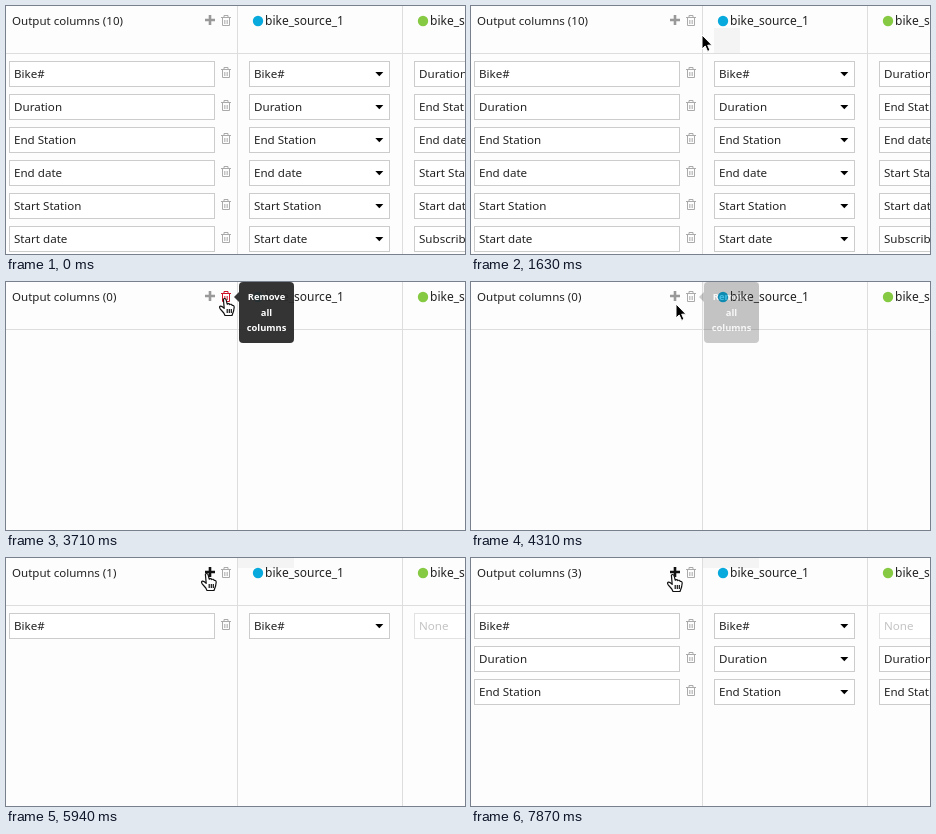
An HTML page for the animation above (8000 ms loop, 459 by 248 pixels).

```html
<!DOCTYPE html>
<html lang="en">
<head>
<meta charset="utf-8">
<title>Column mapping</title>
<style>
  html, body { margin: 0; width: 100%; height: 100%; overflow: hidden; background: #fdfdfd; }
  svg { display: block; width: 459px; height: 248px; }
  text { font: 11.6px "Noto Sans", "Open Sans", sans-serif; fill: #222; }
  .head { font-size: 12px; }
  #count { font-size: 11.55px; }
  .tip text { font: 700 9.4px "Noto Sans", "Open Sans", sans-serif; fill: #fff; text-anchor: middle; }
  .tip .panel { fill: #2a2a2a; fill-opacity: .95; }
  .rule { stroke: #ddd; }
  .box { fill: #fff; stroke: #ccc; }
  .empty .box { stroke: #e2e2e2; }
  .empty text { fill: #c4c4c4; }
  .bin { fill: none; stroke: #aaa; }
  .bin.hot { stroke: #ce1228; }
  .plus { stroke: #999; stroke-width: 2.6; }
  .plus.hot { stroke: #111; }
  .shade { fill: #f4f4f4; }
</style>
</head>
<body>
<svg viewBox="0 0 459 248">
  <defs>
    <g id="bin">
      <path d="M-5 -3.5H5M-2 -3.5V-5.5H2V-3.5M-3.5 -3.5V4.5H3.5V-3.5"/>
      <path d="M-1.5 -1V3M0 -1V3M1.5 -1V3" stroke-width=".7"/>
    </g>
  </defs>
  <rect width="459" height="248" fill="#fdfdfd"/>
  <rect id="shade" class="shade"/>
  <path class="rule" d="M0 47.5H459M231.5 0V248M396.5 0V248"/>
  <text id="count" x="6" y="19"></text>
  <path id="plus" class="plus" d="M199 14H209M204 9V19"/>
  <g id="clear" class="bin"><use href="#bin" x="220" y="15"/></g>
  <circle cx="252" cy="15" r="5.2" fill="#08a9dc"/>
  <text class="head" x="259" y="19">bike_source_1</text>
  <circle cx="417" cy="15" r="5.2" fill="#86c943"/>
  <text class="head" x="424" y="19">bike_source_2</text>
  <g id="rows"></g>
  <g id="tip" class="tip">
    <path class="panel" d="M228 15L233 10V20Z"/>
    <rect class="panel" x="233" width="55" height="61" rx="4"/>
    <text x="260.5" y="18">Remove</text>
    <text x="260.5" y="33.5">all</text>
    <text x="260.5" y="49">columns</text>
  </g>
  <path id="arrow" fill="#000" stroke="#fff" stroke-linejoin="round"
    d="M0 0V14L3.2 11L5.6 16.4L8 15.3L5.7 10.2H10Z"/>
  <path id="hand" fill="#fff" stroke="#111" stroke-width="1.2" stroke-linejoin="round"
    d="M-1.6 1.4Q-.6 -.4 1 1.4L2.2 6.2Q3.8 5 4.8 6.6Q6.4 5.6 7.2 7.4Q9 7 9.2 9.2L8.6 13L7 17.5H0L-1.2 15L-4.8 10.8Q-6.2 8.6 -4.6 8.2Q-3.2 8 -.8 10.4Z
       M2.2 11V15M4.3 11V15M6.3 11V15"/>
</svg>
<script>
const LOOP = 8000;
const CLEARED = 3710;
const ADDED = [5490, 6680, 7870];
const columns = ["Bike#", "Duration", "End Station", "End date", "Start Station", "Start date", "Subscriber Type"];

// [time, x, y, shape]
const pointer = [
  [0, 0, 0, ""],
  [900, 258, 31, "arrow"], [1050, 256, 31, "arrow"], [1190, 252, 30, "arrow"],
  [1340, 245, 30, "arrow"], [1490, 238, 30, "arrow"], [1630, 231, 29, "arrow"],
  [1780, 224, 22, "arrow"], [1930, 220, 16, "hand"], [2520, 219, 16, "hand"],
  [4010, 218, 17, "hand"], [4160, 213, 19, "hand"], [4310, 205, 22, "arrow"],
  [4460, 195, 26, "arrow"], [4600, 187, 30, "arrow"], [4750, 182, 31, "arrow"],
  [4900, 190, 24, "arrow"], [5050, 199, 14, "hand"], [5200, 199, 13.5, "hand"],
  [5640, 201, 15, "hand"], [6390, 202, 16, "hand"]
];
// [time, opacity]
const tipFade = [[0, 0], [2080, .25], [2230, .55], [2370, .85], [2520, 1], [4160, .6], [4310, .25], [4460, 0]];
// [time, x, y, width, height]
const shading = [[0, 0, 0, 0, 0], [900, 243, 22, 26, 25], [2230, 0, 0, 0, 0], [4310, 232, 0, 56, 47], [5490, 232, 0, 56, 10]];

const $ = id => document.getElementById(id);
const at = (steps, t) => steps.findLast(step => step[0] <= t);
const show = (node, on) => node.setAttribute("visibility", on ? "visible" : "hidden");

function field(x, y, width, label, caret) {
  const arrow = caret ? `<path d="M369.3 ${y + 12}h8l-4 4.2z"/>` : "";
  return `<rect class="box" x="${x}" y="${y + 1.5}" width="${width}" height="25"/>
    <text x="${x + 4.5}" y="${y + 18}">${label}</text>${arrow}`;
}

$("rows").innerHTML = columns.slice(0, 6).map((name, i) => {
  const y = 54 + 33 * i;
  return `<g>${field(3.5, y, 205, name)}
    <g class="bin"><use href="#bin" x="220" y="${y + 13}"/></g>
    ${field(243.5, y, 140, name, true)}
    <g class="last">${field(408.5, y, 140, "")}</g></g>`;
}).join("");

const rows = [...$("rows").children].map(node => {
  const last = node.querySelector(".last");
  return { node, last, label: last.querySelector("text") };
});

function draw(t) {
  const full = t < CLEARED;
  const count = full ? 10 : ADDED.filter(time => time <= t).length;
  $("count").textContent = `Output columns (${count})`;

  rows.forEach(({ node, last, label }, i) => {
    show(node, i < count);
    const empty = !full && i === 0;
    last.classList.toggle("empty", empty);
    label.textContent = empty ? "None" : columns[full ? i + 1 : i];
  });

  const [, x, y, shape] = at(pointer, t);
  for (const id of ["arrow", "hand"]) {
    $(id).setAttribute("transform", `translate(${x} ${y})`);
    show($(id), shape === id);
  }
  $("clear").classList.toggle("hot", t >= 1930 && t < 4310);
  $("plus").classList.toggle("hot", t >= 5050);
  $("tip").setAttribute("opacity", at(tipFade, t)[1]);

  const area = at(shading, t);
  ["x", "y", "width", "height"].forEach((key, i) => $("shade").setAttribute(key, area[i + 1]));
}

const start = performance.now();
function tick() {
  draw((performance.now() - start) % LOOP);
  requestAnimationFrame(tick);
}
tick();
</script>
</body>
</html>
```
